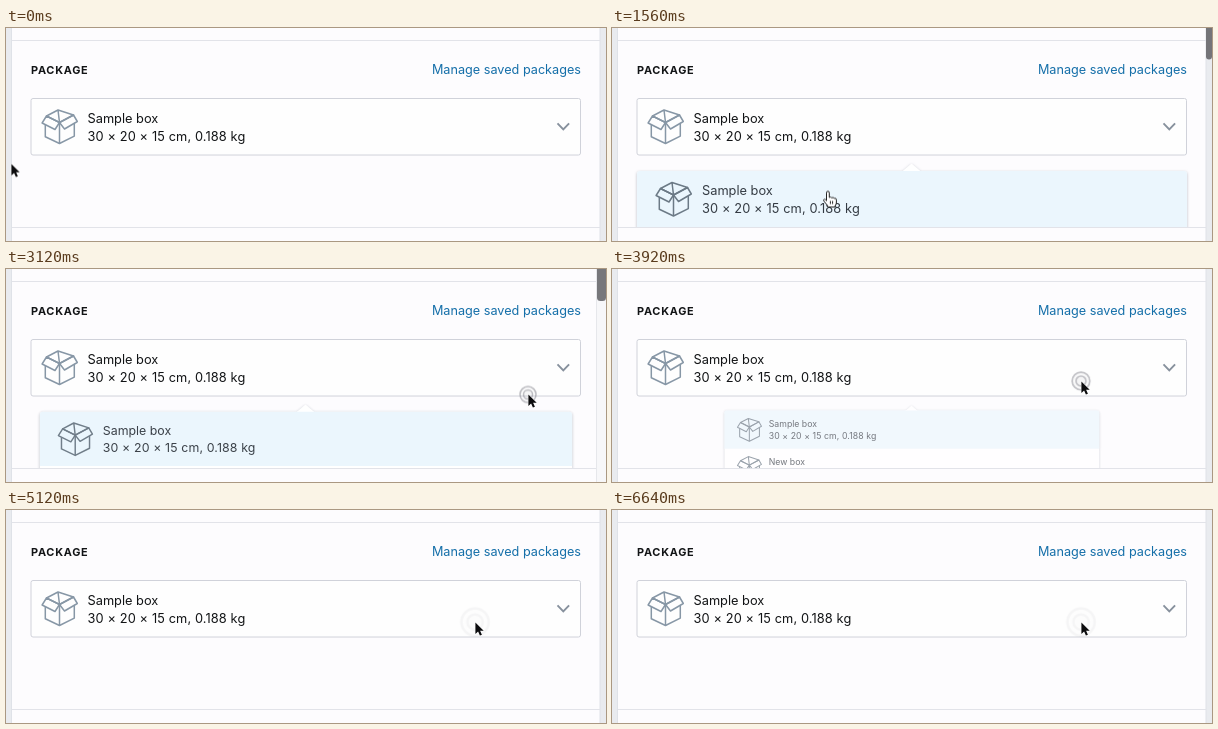
Animation, 600 px wide and 213 px high, one loop 6.68 s. Source, as an HTML page:

```html
<!DOCTYPE html>
<html lang="en">
<head>
<meta charset="utf-8">
<title>Package picker</title>
<style>
  html, body { margin: 0; width: 100%; height: 100%; overflow: hidden; background: #fdfcfe; }
  svg { display: block; width: 600px; height: 213px; }
  text { font: 12.8px Inter, "Open Sans", sans-serif; fill: #121416; }
  .title { font-size: 10.9px; font-weight: 700; letter-spacing: .75px; }
  .link { font-size: 12.67px; fill: #156fa9; text-anchor: end; }
  .size { letter-spacing: .12px; }
  .line { stroke: #e2e3e9; }
  .icon { fill: none; stroke: #8797a6; stroke-width: 1.5; stroke-linejoin: round; }

  .popover, .cursor, .hand, .arrow, .thin, .wide, .ripple {
    animation: 6680ms linear infinite;
  }

  .popover {
    animation-name: popover;
    transform-origin: 299.5px 138.6px;
    filter: drop-shadow(0 1px 1.6px rgba(50, 60, 85, .33));
  }
  .popover text { fill: #343b43; }
  .popover .icon { stroke: #6c7a86; }

  @keyframes popover {
    0%, 49.895%, 73.847%, 96.602%, 100% { transform: scale(0); opacity: 0; }
    6.587%, 57.485%, 81.437% {
      transform: scale(0); opacity: 0;
      animation-timing-function: cubic-bezier(.1, .35, .17, 1);
    }
    11.228%, 62.126%, 86.078% { transform: none; opacity: 1; }
    46.302%, 70.254%, 93.009% {
      transform: none; opacity: 1;
      animation-timing-function: cubic-bezier(.4, 0, .4, 1);
    }
  }

  .cursor { animation-name: move; animation-timing-function: ease-in-out; }
  @keyframes move {
    0%, .9% { transform: translate(5px, 135.5px); }
    4.192%, 16.168% { transform: translate(136px, 104.5px); }
    20.958%, 29.94% { transform: translate(216px, 163.5px); }
    37.725%, 40.12% { transform: translate(593px, 153px); }
    43.114%, 50.898% { transform: translate(522px, 125px); }
    54.491%, 100% { transform: translate(469px, 112px); }
  }

  .hand { animation-name: hand; animation-timing-function: step-end; }
  @keyframes hand {
    0%, 37.275%, 100% { opacity: 0; }
    19.012% { opacity: 1; }
  }
  .arrow { animation-name: arrow; animation-timing-function: step-end; }
  @keyframes arrow {
    0%, 37.275%, 100% { opacity: 1; }
    19.012% { opacity: 0; }
  }

  .thin { animation-name: thin; animation-timing-function: step-end; }
  @keyframes thin {
    0%, 36.527%, 100% { opacity: 0; }
    23.353% { opacity: 1; }
  }
  .wide { animation-name: wide; }
  @keyframes wide {
    0%, 36.526%, 50.299%, 100% { opacity: 0; }
    36.527%, 47.305% { opacity: 1; }
  }

  .ripple {
    animation-name: ripple;
    animation-delay: calc(var(--at) - 6680ms);
    fill: rgba(140, 140, 150, .08);
    stroke: #8e8e96;
    stroke-width: 1.5;
    opacity: 0;
  }
  @keyframes ripple {
    0% { transform: scale(.9); opacity: .6; }
    1.2% { transform: scale(1.1); opacity: .55; }
    6.6% { transform: scale(1.7); opacity: .08; }
    7.1%, 100% { transform: scale(1.75); opacity: 0; }
  }
</style>
</head>
<body>
<svg viewBox="0 0 600 213">
  <defs>
    <g id="box">
      <path d="M5 7.5 16.5 1.5 32 6.5 18 14zM16.5 1.5 18 14V35"/>
      <path d="M5 7.5 18 14 13.5 21 .6 14.5zM32 6.5 18 14 23 20.5 35.8 13z"/>
      <path d="M3.8 16.3V28.3L18 35 32.8 27.6V15"/>
    </g>
    <g id="rings"><circle r="8"/><circle r="4.5"/></g>
    <clipPath id="area"><path d="M0 0H600V199H0z"/></clipPath>
  </defs>

  <rect width="600" height="213" fill="#fdfcfe"/>
  <path d="M0 0H5.5V213H0zM594 0H600V213H594z" fill="#e9ebef"/>
  <path d="M5.5 0V213M594 0V213" stroke="#dfe2e8"/>
  <path class="line" d="M6 12.5H594M6 199.5H594"/>

  <text class="title" x="25" y="46">PACKAGE</text>
  <text class="link" x="575" y="46">Manage saved packages</text>

  <rect x="25" y="70.5" width="549.5" height="56.5" rx="2" fill="#fefefe" stroke="#d0d2da"/>
  <use href="#box" class="icon" x="35.5" y="80.5"/>
  <text x="81.5" y="95">Sample box</text>
  <text class="size" x="81.5" y="112.7">30 × 20 × 15 cm, 0.188 kg</text>
  <path d="M551.5 95.3 557.3 101.3 563.1 95.3" fill="none" stroke="#87919d" stroke-width="1.9"/>

  <g clip-path="url(#area)">
    <g class="popover">
      <path d="M290 143.5 299.5 135.5 309 143.5z" fill="#fff"/>
      <rect x="25" y="143" width="550" height="114" rx="3" fill="#fff"/>
      <path d="M25 199V146a3 3 0 0 1 3-3H572a3 3 0 0 1 3 3V199z" fill="#ebf6fd"/>
      <use href="#box" class="icon" x="43.5" y="153"/>
      <text x="90" y="166.7">Sample box</text>
      <text class="size" x="90" y="184.5">30 × 20 × 15 cm, 0.188 kg</text>
      <use href="#box" class="icon" x="43.5" y="209"/>
      <text x="90" y="222.2">New box</text>
      <text class="size" x="90" y="240">30 × 20 × 15 cm, 0.188 kg</text>
    </g>
  </g>

  <rect class="thin" x="594" y="-6" width="6" height="37.5" rx="3" fill="#747478"/>
  <g class="wide">
    <path d="M590 0H600V213H590z" fill="#f7f7f9"/>
    <path d="M590.5 0V213" stroke="#e6e7eb"/>
    <rect x="591" y="-6" width="9" height="38" rx="3.5" fill="#77777b"/>
  </g>

  <g transform="translate(136 104.5)"><use href="#rings" class="ripple" style="--at: 440ms"/></g>
  <g transform="translate(522 125.5)"><use href="#rings" class="ripple" style="--at: 3080ms"/></g>
  <g transform="translate(469 112)">
    <use href="#rings" class="ripple" style="--at: 3840ms"/>
    <use href="#rings" class="ripple" style="--at: 4680ms"/>
    <use href="#rings" class="ripple" style="--at: 5440ms"/>
    <use href="#rings" class="ripple" style="--at: 6200ms"/>
  </g>

  <g class="cursor">
    <path class="arrow" d="M.4 .4V12L3.1 9.5 4.9 13.6 6.9 12.7 5.1 8.7H8.7z" fill="#0c0c0e" stroke="#fff" stroke-width=".9" paint-order="stroke"/>
    <path class="hand" d="M-1.5 9V1.2a1.4 1.4 0 0 1 2.8 0V6q1.4-1 2.5.3 1.5-.8 2.4.5 2-.5 2.2 1.4V11q0 2-1.3 3.2V15.5H.3Q-1 13-4 9.8q-1.2-1.8.4-2 1 0 2.1 1.4zM2.4 9.5V12.5M4.6 9.5V12.5" fill="#fff" stroke="#222" stroke-linejoin="round"/>
  </g>
</svg>
</body>
</html>
```
